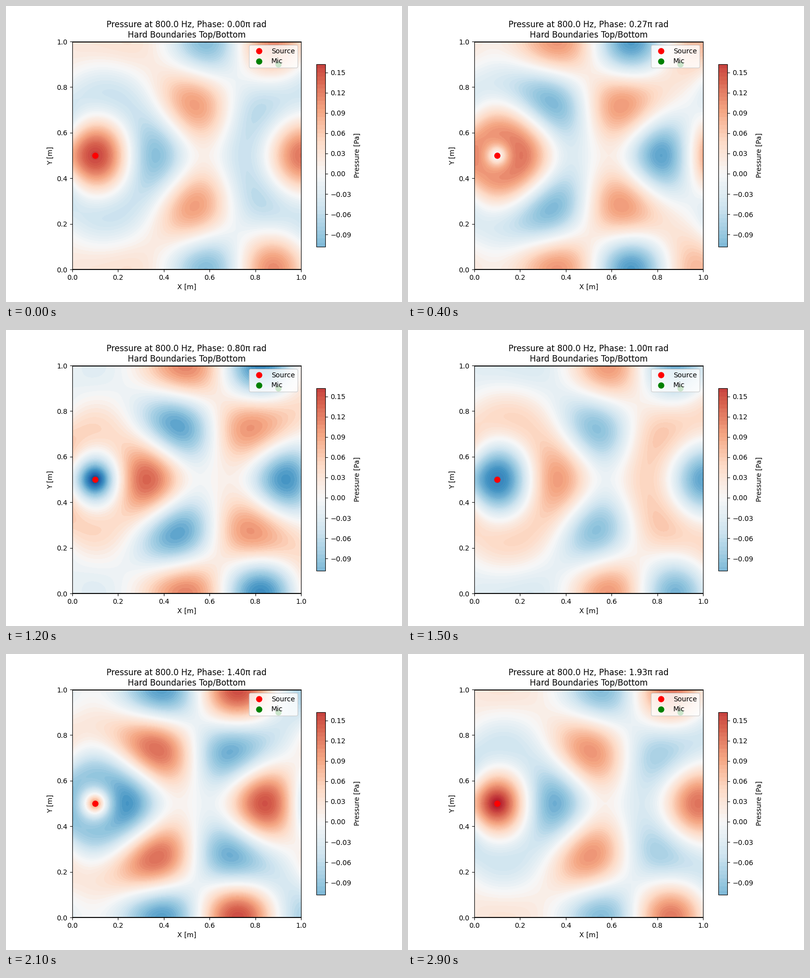
Recreate the animation shown at these times as a matplotlib script. Size 800 px wide and 600 px high, loop 3000 ms.

```python
import numpy as np
import matplotlib.pyplot as plt
from matplotlib.animation import FuncAnimation

FRAMES, INTERVAL = 30, 100
FREQ, SPEED = 800.0, 343.0
K = 2 * np.pi * FREQ / SPEED
EMITTER, MIC = (0.1, 0.5), (0.9, 0.9)
SPREAD = 0.018      # width of the emitter
STRENGTH = 0.773
VMAX = 0.236
N = 201

x = np.linspace(0, 1, N)
h = x[1] - x[0]


def mode_profile(n):
    """Wave along x for the n-th cross mode, with absorbing ends."""
    mass = np.full(N, h)
    mass[[0, -1]] = h / 2
    stiff = np.full(N, 2 / h)
    stiff[[0, -1]] = 1 / h
    diag = stiff - (K**2 - (n * np.pi)**2) * mass + 0j
    diag[[0, -1]] -= 1j * K
    off = np.full(N - 1, -1 / h)
    system = np.diag(diag) + np.diag(off, 1) + np.diag(off, -1)
    load = np.exp(-(x - EMITTER[0])**2 / (2 * SPREAD**2))
    load /= np.sum(load * mass)
    return np.linalg.solve(system, load * mass)


def solve_field():
    """Sum the modes between hard walls at y = 0 and y = 1."""
    field = np.zeros((N, N), complex)
    for n in range(0, 76, 2):
        weight = (1 if n == 0 else 2) * np.cos(n * np.pi * EMITTER[1])
        weight *= np.exp(-(n * np.pi * SPREAD)**2 / 2)
        field += weight * np.outer(np.cos(n * np.pi * x), mode_profile(n))
    return -1j * STRENGTH * field


field = solve_field()
fig, ax = plt.subplots(figsize=(8, 6), dpi=100)


def draw(i):
    ax.clear()
    phase = 2 * np.pi * i / FRAMES
    pressure = np.real(field * np.exp(-1j * phase))
    filled = ax.contourf(x, x, pressure, levels=50, cmap="RdBu_r",
                         vmin=-VMAX, vmax=VMAX)
    ax.plot(*EMITTER, "ro", markersize=8, label="Source")
    ax.plot(*MIC, "go", markersize=8, label="Mic")
    for wall in (0, 1):
        ax.axhline(wall, color="k", linewidth=2)
    ax.set(xlim=(0, 1), ylim=(0, 1), aspect="equal",
           xlabel="X [m]", ylabel="Y [m]")
    ax.set_title(f"Pressure at {FREQ} Hz, Phase: {phase / np.pi:.2f}π rad\n"
                 "Hard Boundaries Top/Bottom")
    ax.legend(loc="upper right")
    return filled


fig.colorbar(draw(0), ax=ax, shrink=0.8, label="Pressure [Pa]")

anim = FuncAnimation(fig, draw, frames=FRAMES, interval=INTERVAL,
                     init_func=lambda: None, repeat=True, repeat_delay=0)
plt.show()
```
